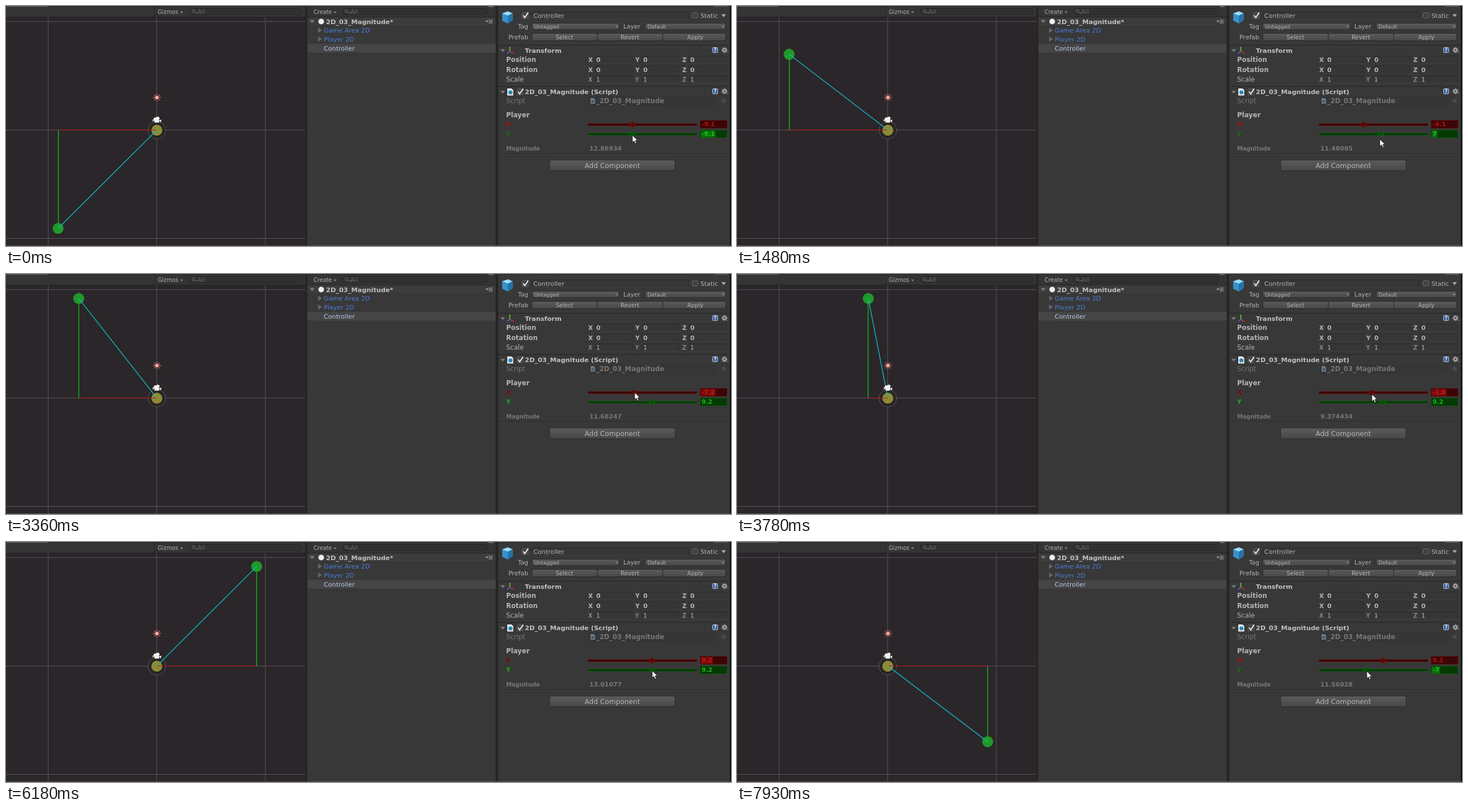
An HTML page that plays this animation: 1280x425 px, repeating every 8000 ms.

```html
<!DOCTYPE html>
<html lang="en">
<head>
<meta charset="utf-8">
<title>Vector magnitude</title>
<style>
html, body { margin: 0; width: 100%; height: 100%; overflow: hidden; background: #383838; }
svg { display: block; width: 100vw; height: 100vh; }
text { font-family: "DejaVu Sans", Verdana, sans-serif; white-space: pre; }
</style>
</head>
<body>
<svg id="stage" viewBox="0 0 1280 425" xmlns="http://www.w3.org/2000/svg"></svg>
<script>
const LOOP = 8000, ORIGIN = { x: 266.3, y: 219.6 }, UNIT = 19.15;
const GREY = '#b4b4b4', DIM = '#767676', BLUE = '#4a7dd6';

// ---------- drawing helpers ----------
const rect = (x, y, w, h, fill, more = '') =>
  `<rect x="${x}" y="${y}" width="${w}" height="${h}" fill="${fill}" ${more}/>`;
const text = (x, y, str, size = 11.15, fill = GREY, more = '') =>
  `<text x="${x}" y="${y}" font-size="${size}" fill="${fill}" ${more}>${str}</text>`;
const bold = (x, y, str, size = 11.35, fill = GREY, more = '') =>
  text(x, y, str, size, fill, 'font-weight="700" ' + more);
const circle = (x, y, r, fill, more = '') =>
  `<circle cx="${x}" cy="${y}" r="${r}" fill="${fill}" ${more}/>`;
const path = (d, fill, more = '') => `<path d="${d}" fill="${fill}" ${more}/>`;
const stroke = (d, color, w = 1, more = '') =>
  path(d, 'none', `stroke="${color}" stroke-width="${w}" ${more}`);
const mid = 'text-anchor="middle"';

const down = (x, y, r, fill = '#8a8a8a') => path(`M${x - r} ${y - r / 2}h${2 * r}l${-r} ${r * 1.3}z`, fill);
const right = (x, y) => path(`M${x} ${y - 4.5}v9l7 -4.5z`, '#666');
const field = (x, y, w, h = 14) =>
  rect(x, y, w, h, '#404040', 'rx="1.5"') + rect(x, y, w, h - 1, '#2b2b2b', 'rx="1.5"') +
  rect(x + 1, y + 1, w - 2, h - 2, '#363636');
const button = (x, y, w, h, r = 3) =>
  rect(x, y, w, h, 'url(#btn)', `rx="${r}" stroke="#2a2a2a"`);
const search = (x, w) =>
  rect(x, 4.5, w, 11, '#303030', 'rx="5.5" stroke="#262626"') +
  circle(x + 7, 9, 2.6, 'none', 'stroke="#707070"') + stroke(`M${x + 9} 11l2.5 2.5`, '#707070') +
  down(x + 13, 12, 1.6, '#707070') + text(x + 14, 13.5, 'All', 10.8, '#686868');
const check = (x, y) =>
  rect(x, y, 11, 11, '#444', 'rx="2" stroke="#666" stroke-width=".8"') +
  stroke(`M${x + 2} ${y + 5}l3 4l6 -9`, '#eee', 2);

function helpIcons(y) {
  let spokes = '';
  for (let i = 0; i < 8; i++) {
    const a = i * Math.PI / 4;
    spokes += `M1268.5 ${y}l${(5 * Math.cos(a)).toFixed(1)} ${(5 * Math.sin(a)).toFixed(1)}`;
  }
  return rect(1247.5, y - 4.5, 9, 9, '#3c6098', 'rx="1" stroke="#b9c6d8"') +
    bold(1252, y + 3.4, '?', 8, '#eef', mid) +
    stroke(spokes, '#a5a5a5', 2) + circle(1268.5, y, 3, '#a5a5a5') +
    circle(1268.5, y, 1.4, '#383838') + down(1274.5, y + 4, 1.6);
}

// ---------- static parts ----------
function scene() {
  let s = rect(0, 0, 529, 425, '#2a262a') + rect(0, 0, 529, 19.5, '#343434') +
    rect(0, 0, 529, 1, '#222') + rect(0, 0, 74, 1.5, '#5a5252') +
    rect(262, 1, 1, 18, '#282828') + text(268, 14, 'Gizmos', 9.8) +
    down(310, 11, 2.6) + search(324, 199) + rect(0, 19, 529, 1, '#232323');
  s += stroke('M74.5 20V425M266 20V425M457.8 20V425M0 27.7H529M0 219.7H529M0 411.5H529', '#59565a');
  // light gizmo
  for (let i = 0; i < 8; i++) {
    s += `<path d="M-1.2 -4.5h2.4l-1.2 -4z" fill="#98645f" transform="translate(266.5 162) rotate(${i * 45})"/>`;
  }
  s += circle(266.5, 162, 4.6, '#6d4040') + circle(266.5, 162, 3.1, '#f2a8a4');
  s += circle(266.3, 220, 15.5, '#272427', 'stroke="#5c595c"') + circle(266.3, 220, 9.7, '#8f8a35');
  return s;
}

const camera = () =>
  circle(263.5, 200, 2.7, '#f2f2f2') + circle(268, 199, 3.1, '#f2f2f2') +
  rect(262, 201, 8.5, 5.4, '#f2f2f2', 'rx="1"') + path('M270 203l4 -2v5z', '#f2f2f2') +
  path('M263 202l-4 -1.5v4z', '#f2f2f2');

function hierarchy() {
  return rect(528.5, 0, 4, 425, '#252525') + rect(532, 0, 333, 425, '#383838') +
    rect(532, 0, 333, 19.5, '#343434') + rect(532, 0, 333, 1, '#242424') +
    rect(852, 0, 9, 2, '#666') +
    text(543, 14, 'Create', 9.7) + down(581, 11, 2.6) + search(594, 257) +
    rect(532, 19, 333, 1, '#242424') + rect(532, 20, 333, 15, '#3c3c3c') + rect(532, 35, 333, 1, '#323232') +
    down(540.5, 27, 4.4, '#777') + circle(556.5, 27.5, 5, '#eee') +
    bold(565, 31.5, '2D_03_Magnitude*', 11.35, '#c0c0c0') +
    down(849, 27, 2.4, '#aaa') + stroke('M852 25h7M852 27.5h7M852 30h7', '#aaa') +
    rect(532, 67, 333, 15.5, '#454545') +
    right(551, 43) + text(561, 47.3, 'Game Area 2D', 11.15, BLUE) +
    right(551, 58.5) + text(561, 63, 'Player 2D', 11.15, BLUE) +
    text(561, 78.5, 'Controller', 11.15, '#b9c8ec');
}

function vectorRow(label, y, value, strong) {
  const write = strong ? bold : text;
  let s = write(883, y, label, 11.55);
  'XYZ'.split('').forEach((axis, i) => {
    const x = 1028 + 83 * i;
    s += write(x, y, axis, 10.4) + field(x + 11.5, y - 11, 67) + write(x + 14, y, value, 11);
  });
  return s;
}

function inspector() {
  let s = rect(864.5, 0, 5, 425, '#252525') + rect(869, 0, 409, 425, '#383838') +
    rect(869, 0, 409, 1, '#242424') + rect(1250, 0, 24, 1.5, '#555') +
    rect(1278, 0, 2, 425, '#0c0c0c');
  // header
  s += path('M876 13l10 -3.5l8.5 3.5v12l-8.5 6l-10 -5z', '#3a90c8') +
    path('M876 13l10 -3.5l8.5 3.5l-8.5 4z', '#9cdcf8') + path('M886 17l8.5 -4v12l-8.5 6z', '#2674ac') +
    check(911, 11.5) + field(928, 10, 277) + text(931, 21, 'Controller') +
    rect(1211.5, 12, 10, 9, '#404040', 'rx="2" stroke="#757575" stroke-width=".9"') +
    text(1226, 21, 'Static', 10.8) + down(1267, 16.5, 4, '#aaa') +
    text(922, 40, 'Tag', 10.6, GREY, 'text-anchor="end"') + button(928.5, 30.5, 154, 11.5) +
    text(932.5, 39.7, 'Untagged', 9) + down(1078, 36.5, 2.6) +
    text(1090, 40, 'Layer', 10.7) + button(1128.5, 30.5, 142, 11.5) +
    text(1132.5, 39.7, 'Default', 9) + down(1266, 36.5, 2.6) +
    text(922, 59, 'Prefab', 11, GREY, 'text-anchor="end"');
  ['Select', 'Revert', 'Apply'].forEach((name, i) => {
    const x = 928.5 + 115.5 * i;
    s += button(x, 48.5, i < 2 ? 115.5 : 111, 13) + text(x + 57.5, 58.5, name, 10.1, GREY, mid);
  });
  // transform
  s += rect(869, 69, 409, 1, '#232323') + down(877, 78.5, 4.2, '#777') +
    stroke('M889.5 80.5V72', '#5fc828', 1.8) + stroke('M889.5 80.5l7 3.5', '#d03020', 1.8) +
    stroke('M889.5 80.5l-5 3.5', '#3868d8', 1.8) +
    bold(916, 83, 'Transform', 11.35, '#c0c0c0') + helpIcons(78) +
    vectorRow('Position', 99, '0', true) + vectorRow('Rotation', 116.5, '0', true) +
    vectorRow('Scale', 134, '1', false);
  // script component
  s += rect(869, 142, 409, 1, '#232323') + down(877, 152, 4.2, '#777') +
    path('M885 146h7.5l3 3v9.5h-10.5z', '#e4ecf0') + circle(890.5, 153, 3.6, '#2a86b4') +
    check(902, 146.5) + bold(916, 156.3, '2D_03_Magnitude (Script)', 11.35, '#c0c0c0') + helpIcons(151) +
    text(883, 172, 'Script', 11.6, DIM) +
    rect(1030, 161.5, 224, 13.5, '#363636', 'rx="1.5" stroke="#323232"') +
    path('M1032 163h5.5l2.5 2.5v7.5h-8z', '#6f7780') + circle(1036, 169, 2.3, '#3c5a70') +
    bold(1042, 172, '_2D_03_Magnitude', 11.5, DIM) +
    circle(1267, 168, 3, 'none', 'stroke="#606060"') + circle(1267, 168, 1, '#606060') +
    bold(883, 197.3, 'Player', 11.7) +
    bold(883, 255.7, 'Magnitude', 9.9, DIM) +
    rect(869, 261, 409, 1, '#262626') + rect(869, 262, 409, 1, '#424242') +
    button(959.8, 272.8, 221.4, 19) + text(1070.5, 286.5, 'Add Component', 12.2, GREY, mid);
  return s;
}

const slider = (id, y, track, edge, knob) =>
  bold(883, y + 3.2, id.toUpperCase(), 10.4, edge, `id="${id}Label"`) +
  rect(1027, y - 1.2, 193, 4, track, `rx="2" stroke="${edge}" stroke-width=".5"`) +
  circle(0, y + .8, 4.4, knob, `id="${id}Knob" stroke="${edge}"`) +
  rect(1225.5, y - 6.8, 47.5, 14, track, `rx="1" stroke="${edge}" stroke-width=".5"`) +
  rect(1227, y - 5.5, 26, 12, edge, `id="${id}Sel"`) +
  bold(1228, y + 4, '', 10.8, edge, `id="${id}Val"`);

const moving = () =>
  stroke('', '#7c2a2a', 1.4, 'id="tick"') + circle(0, 0, 9.7, '#20982a', 'id="ball"') +
  stroke('', '#c81212', 1, 'id="lineX"') + stroke('', '#1bb01b', 1.5, 'id="lineY"') +
  stroke('', '#12b8bb', 1.4, 'id="lineMag"');

const pointer = () =>
  `<g id="cursor">${path('M0 0V12.4L2.9 9.8L5 14.6L7 13.7L5 9H9z', '#fff', 'stroke="#111" stroke-width=".7"')}` +
  circle(10.5, 1, 4.6, '#20384c', 'id="busy" stroke="#3c9ff0" stroke-width="2.4"') + '</g>';

const stage = document.getElementById('stage');
stage.innerHTML =
  `<defs><linearGradient id="btn" x1="0" y1="0" x2="0" y2="1">
    <stop offset="0" stop-color="#5c5c5c"/><stop offset="1" stop-color="#474747"/></linearGradient></defs>` +
  scene() + moving() + camera() + hierarchy() + inspector() +
  slider('x', 209.3, '#3c0505', '#7c0a0a', '#5c0909') +
  slider('y', 226.3, '#053a05', '#0a700a', '#075007') +
  bold(1030, 255.7, '', 10.9, DIM, 'id="mag"') +
  rect(0, 424, 1280, 1, '#5a5a5a') + pointer();

// ---------- motion ----------
// moments at which the screen refreshes
const TICKS = [0, 150, 270, 400, 530, 670, 800, 930, 1080, 1200, 1340, 1490, 1630,
  2040, 2160, 2290, 2420, 2540, 2670, 2800, 2930, 3200, 3350, 3490, 3640, 3780, 3900, 4060, 4210,
  4360, 4500, 4650, 4790, 4940, 5320, 5600, 5740, 5890, 6030, 6180,
  6490, 6610, 6740, 6860, 6990, 7110, 7250, 7380, 7510, 7660, 7800, 7930];
// [time, value...] with straight runs between
const X_KEYS = [[3200, -9.1], [3780, -1.8], [4210, .3], [4790, 8.7], [4940, 9.2]];
const Y_KEYS = [[0, -9.1], [930, 2.9], [1080, 5.1], [1630, 9.2], [6490, 9.2], [6990, 3.4], [7510, -2.3], [7930, -7]];
const CURSOR_KEYS = [[0, 1106, 229], [930, 1129, 235], [1630, 1140, 236], [1950, 1140, 236],
  [2420, 1118, 228], [2930, 1106, 209], [3200, 1106, 209], [3780, 1121, 213], [4210, 1125, 215],
  [4790, 1141, 220], [5320, 1141, 219], [5470, 1141, 219], [5740, 1149, 230], [5890, 1150, 239],
  [6180, 1141, 228], [6490, 1141, 227], [6990, 1131, 226], [7930, 1112, 229]];

function sample(keys, t) {
  if (t <= keys[0][0]) return keys[0].slice(1);
  const i = keys.findIndex(k => k[0] > t);
  if (i < 0) return keys[keys.length - 1].slice(1);
  const a = keys[i - 1], b = keys[i], p = (t - a[0]) / (b[0] - a[0]);
  return a.slice(1).map((v, n) => v + (b[n + 1] - v) * p);
}

const el = {};
stage.querySelectorAll('[id]').forEach(node => { el[node.id] = node; });
const set = (id, attrs) => { for (const k in attrs) el[id].setAttribute(k, attrs[k]); };
const tenth = v => Math.round(v * 10) / 10;
const f32 = Math.fround;

function magnitude(x, y) {
  const fx = f32(x), fy = f32(y);
  return Number(f32(Math.sqrt(f32(f32(fx * fx) + f32(fy * fy)))).toPrecision(7));
}

function showAxis(id, v, focused, hues) {
  set(id + 'Knob', { cx: 1123.3 + v * 1.88 });
  set(id + 'Label', { fill: focused ? hues.dim : hues.bright });
  set(id + 'Val', { fill: focused ? hues.picked : hues.bright });
  set(id + 'Sel', { visibility: focused ? 'visible' : 'hidden' });
  el[id + 'Val'].textContent = v;
  set(id + 'Sel', { width: el[id + 'Val'].getComputedTextLength() + 2 });
}

function draw(t) {
  const x = tenth(sample(X_KEYS, t)[0]), y = tenth(sample(Y_KEYS, t)[0]);
  const [cx, cy] = sample(CURSOR_KEYS, t).map(Math.round);
  const bx = ORIGIN.x + x * UNIT, by = ORIGIN.y - y * UNIT;
  const focusX = t >= 3200 && t < 6490;

  set('ball', { cx: bx, cy: by });
  set('tick', { d: `M${bx} ${by - 12.5}V${by - 8}` });
  set('lineX', { d: `M${ORIGIN.x} ${ORIGIN.y}H${bx}` });
  set('lineY', { d: `M${Math.floor(bx) + .5} ${ORIGIN.y}V${by}` });
  set('lineMag', { d: `M${ORIGIN.x} ${ORIGIN.y}L${bx} ${by}` });
  showAxis('x', x, focusX, { dim: '#850606', bright: '#b01010', picked: '#c01616' });
  showAxis('y', y, !focusX, { dim: '#0b7a0b', bright: '#18b418', picked: '#1cc01c' });
  el.mag.textContent = magnitude(x, y);
  set('cursor', { transform: `translate(${cx} ${cy})` });
  set('busy', { visibility: t >= 930 && t < 1200 ? 'visible' : 'hidden' });
}

let shown = -1;
const start = performance.now();
function frame() {
  const t = (performance.now() - start) % LOOP;
  const tick = TICKS.filter(v => v <= t).pop();
  if (tick !== shown) draw(shown = tick);
  requestAnimationFrame(frame);
}
frame();
</script>
</body>
</html>
```
